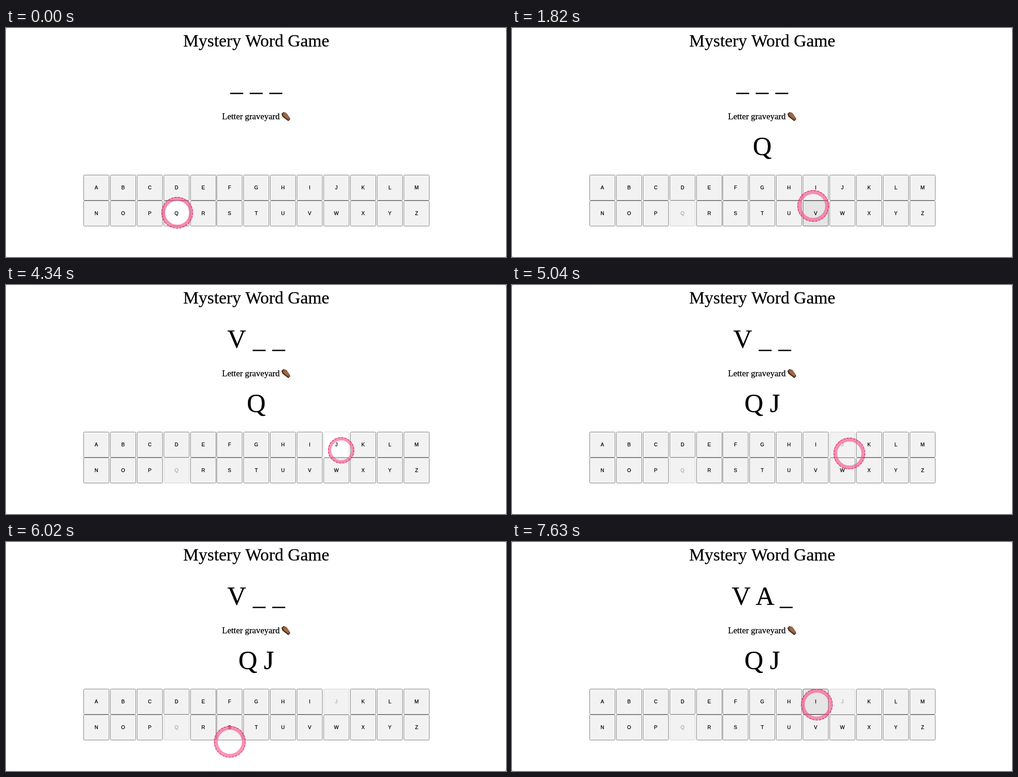
Animation, 1104 px wide and 507 px high, one loop 8000 ms. Source, as an HTML page with a canvas:

```html
<!DOCTYPE html>
<html lang="en">
<head>
<meta charset="utf-8">
<title>Mystery Word Game</title>
<style>
  html, body { margin: 0; width: 100%; height: 100%; overflow: hidden; background: #fff; }
  canvas { display: block; }
</style>
</head>
<body>
<canvas id="stage" width="1104" height="507"></canvas>
<script>
const ctx = document.getElementById('stage').getContext('2d');
const LOOP = 8000, TICK = 70, CENTER = 552.5, KEY_SIZE = 57;
const SERIF = '"Liberation Serif", "Times New Roman", serif';
const SANS = '"Liberation Sans", Arial, sans-serif';
const WORD = 'VA?';

// Pointer stops: departure, arrival (ms), position
const STOPS = [
  { from: 0, to: 0, x: 378, y: 409 },
  { from: 1260, to: 1820, x: 665, y: 394 },
  { from: 1820, to: 2030, x: 670, y: 410 },
  { from: 3640, to: 3990, x: 723, y: 360 },
  { from: 4060, to: 4270, x: 740, y: 366 },
  { from: 4900, to: 5300, x: 780, y: 425 },
  { from: 5320, to: 5740, x: 500, y: 444 },
  { from: 5880, to: 6510, x: 203, y: 360 },
  { from: 7280, to: 7630, x: 673, y: 360 }
];

const CLICKS = [
  { letter: 'Q', down: 700, up: 770 },
  { letter: 'V', down: 2380, up: 2590 },
  { letter: 'J', down: 4270, up: 4410 },
  { letter: 'A', down: 6650, up: 6790 }
];

const ease = u => u < .5 ? 8 * u ** 4 : 1 - 8 * (1 - u) ** 4;

function pointerAt(t) {
  const next = STOPS.findLastIndex(stop => t >= stop.from);
  const stop = STOPS[next], start = STOPS[Math.max(0, next - 1)];
  const e = t >= stop.to ? 1 : ease((t - stop.from) / (stop.to - stop.from));
  return { x: start.x + (stop.x - start.x) * e, y: start.y + (stop.y - start.y) * e };
}

// Thin outline gives the text its slightly heavier weight
function text(str, x, y, size, family, align = 'center', color = '#000') {
  ctx.font = `${size}px ${family}`;
  ctx.textAlign = align;
  ctx.fillStyle = ctx.strokeStyle = color;
  ctx.lineWidth = .3;
  ctx.fillText(str, x, y);
  ctx.strokeText(str, x, y);
}

// Spaced letters; A sits closer to its neighbours
function letterRow(letters, baseline) {
  const size = 57.6;
  ctx.font = `${size}px ${SERIF}`;
  let width = 0;
  const offsets = letters.map((c, i) => {
    if (i) width += size * (c === 'A' || letters[i - 1] === 'A' ? .195 : .25);
    const offset = width;
    width += ctx.measureText(c).width;
    return offset;
  });
  letters.forEach((c, i) => {
    const x = CENTER - width / 2 + offsets[i];
    if (c !== '_') return text(c, x, baseline, size, SERIF, 'left');
    ctx.fillStyle = '#000';
    ctx.fillRect(x, baseline + 4, size / 2, 2.9);
  });
}

function coffin() {
  const layers = [['#3f2416', 1, 1.2], ['#8a583a', .88, -.4], ['#a06a48', .6, -.6]];
  for (const [color, scale, shift] of layers) {
    ctx.save();
    ctx.translate(618.8, 195.3);
    ctx.rotate(Math.PI * .26);
    ctx.translate(0, shift);
    ctx.scale(scale, scale);
    ctx.fillStyle = color;
    ctx.beginPath();
    for (const side of [-1, 1]) {
      const outline = [[-11, 3], [-5, 5.5], [11, 3]];
      for (const [x, y] of side < 0 ? outline : outline.reverse()) ctx.lineTo(x, y * side);
    }
    ctx.fill();
    ctx.restore();
  }
}

function keyboard(t, pointer) {
  for (let i = 0; i < 26; i++) {
    const letter = String.fromCharCode(65 + i);
    const x = Math.round(171 + i % 13 * 58.88), y = i < 13 ? 325 : 382;
    const click = CLICKS.find(c => c.letter === letter);
    const pressed = click && t >= click.down && t < click.up;
    const disabled = click && t >= click.up && !WORD.includes(letter);
    const hover = t >= CLICKS[0].down && !disabled &&
      Math.abs(pointer.x - x - KEY_SIZE / 2) < KEY_SIZE / 2 &&
      Math.abs(pointer.y - y - KEY_SIZE / 2) < KEY_SIZE / 2;

    ctx.beginPath();
    ctx.roundRect(x + .5, y + .5, KEY_SIZE - 1, KEY_SIZE - 1, 2);
    ctx.fillStyle = pressed ? '#fff' : hover ? '#e5e5e5' : '#f2f2f2';
    ctx.fill();
    ctx.strokeStyle = pressed || disabled ? '#cecece' : hover ? '#555' : '#767676';
    ctx.lineWidth = 1;
    ctx.stroke();

    if (letter === 'Q' && t < click.down) {
      ctx.fillStyle = '#fff';
      circle(pointer, 26.5);
      ctx.fill();
    }
    text(letter, x + KEY_SIZE / 2, y + 32, 11, SANS, 'center', disabled ? '#aaa' : '#000');
  }
}

function circle({ x, y }, radius) {
  ctx.beginPath();
  ctx.arc(x, y, radius, 0, Math.PI * 2);
}

function ring(pointer, radius) {
  const band = radius * .24;
  ctx.strokeStyle = 'rgba(246, 72, 128, .58)';
  ctx.lineWidth = band;
  circle(pointer, radius - band / 2);
  ctx.stroke();
  ctx.strokeStyle = '#d4316c';
  ctx.lineWidth = 1.4;
  ctx.setLineDash([4.6, 2.8]);
  circle(pointer, radius - .7);
  ctx.stroke();
  ctx.setLineDash([]);
}

function draw(t) {
  const pointer = pointerAt(t);
  const guessed = CLICKS.filter(c => t >= c.up).map(c => c.letter);
  const pressing = CLICKS.some(c => t >= c.down && t < c.up);

  ctx.fillStyle = '#777';
  ctx.fillRect(0, 0, 1104, 507);
  ctx.fillStyle = '#fff';
  ctx.beginPath();
  ctx.roundRect(0, 0, 1104, 507, 2.5);
  ctx.fill();

  text('Mystery Word Game', CENTER, 41, 38.3, SERIF);
  letterRow([...WORD].map(c => guessed.includes(c) ? c : '_'), 139.4);
  text('Letter graveyard', 477, 202, 19.2, SERIF, 'left');
  coffin();
  letterRow(guessed.filter(c => !WORD.includes(c)), 281);
  keyboard(t, pointer);
  ring(pointer, pressing ? 29 : 35);
}

function frame() {
  const t = performance.now() % LOOP;
  draw(Math.floor(t / TICK) * TICK);
  requestAnimationFrame(frame);
}
frame();
</script>
</body>
</html>
```
